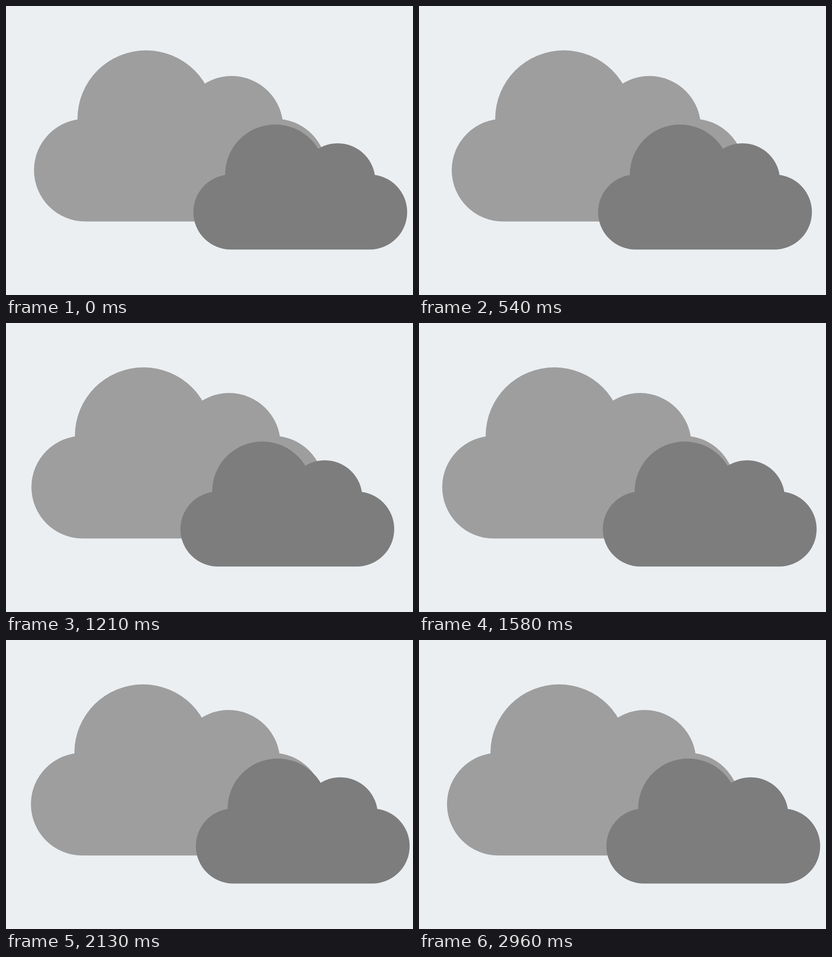
Write an HTML page with a canvas that moves like this. It is 887x631 px and loops after 3040 ms.

```html
<!DOCTYPE html>
<html lang="en">
<head>
<meta charset="utf-8">
<title>Drifting clouds</title>
<style>
  html, body { margin: 0; width: 100%; height: 100%; overflow: hidden; background: #ebeff2; }
  canvas { display: block; }
</style>
</head>
<body>
<canvas id="stage" width="887" height="631"></canvas>
<script>
const ctx = document.getElementById('stage').getContext('2d');
const LOOP = 3040, FPS = 24, LAST = 71;

function bezier(x1, y1, x2, y2) {
  const at = (a, b, s) => 3 * a * s * (1 - s) ** 2 + 3 * b * s * s * (1 - s) + s ** 3;
  return x => {
    let lo = 0, hi = 1;
    for (let i = 0; i < 30; i++) {
      const mid = (lo + hi) / 2;
      if (at(x1, x2, mid) < x) lo = mid; else hi = mid;
    }
    return at(y1, y2, (lo + hi) / 2);
  };
}

const inOut = bezier(0.42, 0, 0.58, 1);
const out = bezier(0.17, 0.45, 0.58, 1);

// Keys: [frame, horizontal offset, easing towards the next key]
const clouds = [
  { x: 61, y: 96.8, unit: 18.69, color: '#9e9e9e',
    keys: [[0, 0, out], [15, 10.5, inOut], [36, -10.5, inOut], [72, 0]] },
  { x: 408.3, y: 258.8, unit: 13.65, color: '#7d7d7d',
    keys: [[0, 0, inOut], [24, -31.5, inOut], [48, 5.6, inOut], [72, 0]] }
];

// Cloud in its own units: [cx, cy, r]
const puffs = [[6, 14, 6], [13.07, 8, 8], [23.05, 9, 6], [28.14, 14, 6]];

function offset(keys, frame) {
  const i = keys.findIndex((k, n) => n > 0 && frame <= k[0]);
  const [t0, v0, ease] = keys[i - 1], [t1, v1] = keys[i];
  return v0 + (v1 - v0) * ease((frame - t0) / (t1 - t0));
}

function drawCloud({ x, y, unit, color, keys }, frame) {
  ctx.save();
  ctx.translate(x + offset(keys, frame), y);
  ctx.scale(unit, unit);
  ctx.fillStyle = color;
  ctx.beginPath();
  for (const [cx, cy, r] of puffs) {
    ctx.moveTo(cx + r, cy);
    ctx.arc(cx, cy, r, 0, Math.PI * 2);
  }
  ctx.rect(6, 8.1, 22.14, 11.9);
  ctx.fill();
  ctx.restore();
}

const start = performance.now();

function draw() {
  const t = (performance.now() - start) % LOOP;
  const frame = Math.min(LAST, Math.floor((t + 4) * FPS / 1000));
  ctx.fillStyle = '#ebeff2';
  ctx.fillRect(0, 0, 887, 631);
  for (const cloud of clouds) drawCloud(cloud, frame);
  requestAnimationFrame(draw);
}
draw();
</script>
</body>
</html>
```
